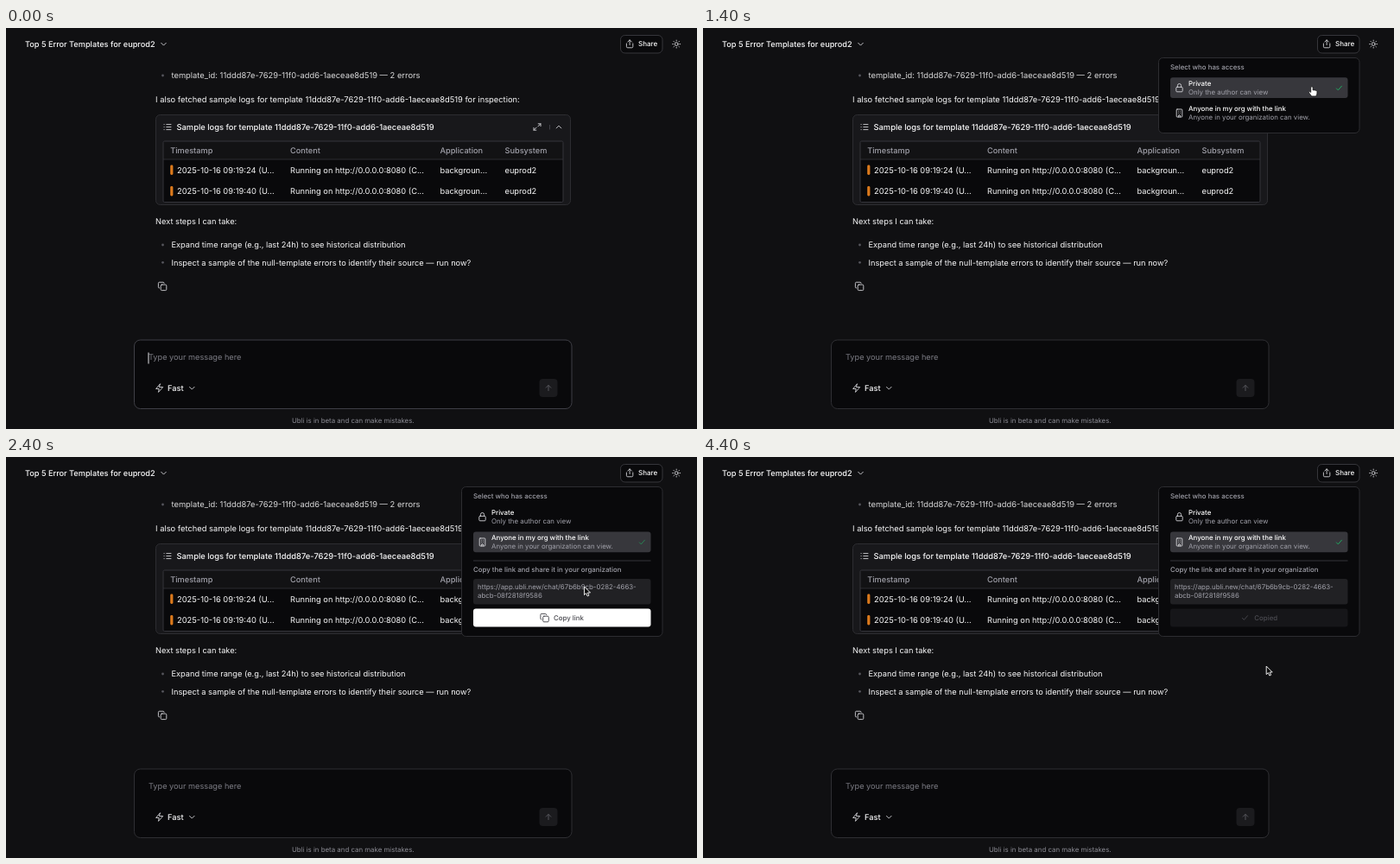
Animation of 800 by 464 pixels, one loop 4.7 s. Source, as an HTML page:

```html
<!DOCTYPE html>
<html lang="en">
<head>
<meta charset="utf-8">
<title>Share a chat</title>
<style>
  html, body { margin: 0; width: 100%; height: 100%; overflow: hidden; background: #101012; }
  svg { display: block; width: 800px; height: 464px; }
  text { font: 400 9.25px Inter, sans-serif; fill: #f8f8f9; white-space: pre; text-rendering: geometricPrecision; }
  .medium { font-weight: 500; }
  .wide { font-size: 9.35px; }
  .label { font-size: 9.2px; }
  .small { font-size: 7.87px; }
  .muted { fill: #a1a1aa; }
  .dim { fill: #7c7c84; }
  .bright { fill: #fff; }
  .icon { fill: none; stroke: #d4d4d8; stroke-width: .9; stroke-linecap: round; stroke-linejoin: round; }
  .selected { fill: #37373c; }
  .check { stroke: #1fa960; stroke-width: 1; }
</style>
</head>
<body>
<svg viewBox="0 0 800 464">
  <defs>
    <g id="copy">
      <rect x="3" y="3" width="6.6" height="6.6" rx="1.2"/>
      <path d="M1.3 6.9Q.2 6.9 .2 5.8V1.4Q.2.2 1.4.2H5.8Q6.9.2 6.9 1.3"/>
    </g>
    <path id="tick" d="M0 2.7L1.9 4.7 6 0"/>
    <path id="chevron" d="M-2.8-1.4L0 1.4 2.8-1.4"/>
  </defs>

  <!-- Header -->
  <text class="medium label" x="22" y="21.8">Top 5 Error Templates for euprod2</text>
  <use href="#chevron" class="icon" x="182.5" y="18.7"/>
  <rect id="shareButton" x="711.5" y="8.5" width="48.5" height="20.5" rx="5" stroke="#36363b"/>
  <path class="icon" d="M718.4 18V21.5Q718.4 22.8 719.7 22.8H724.5Q725.8 22.8 725.8 21.5V18M722.1 19.6V13.9M719.8 16.1L722.1 13.8 724.4 16.1"/>
  <text class="medium" x="732" y="21.4" style="font-size:8px">Share</text>
  <g class="icon" transform="translate(776.2 18.6)">
    <circle r="1.9"/>
    <path d="M0-4.5V-3.7M0 3.7V4.5M-4.5 0H-3.7M3.7 0H4.5M-3.2-3.2L-2.6-2.6M2.6 2.6L3.2 3.2M-3.2 3.2L-2.6 2.6M2.6-2.6L3.2-3.2"/>
  </g>

  <!-- Conversation -->
  <g fill="#55555c">
    <circle cx="181.5" cy="55" r="1.4"/>
    <circle cx="181.5" cy="251" r="1.4"/>
    <circle cx="181.5" cy="271.3" r="1.4"/>
  </g>
  <text class="wide" x="191.5" y="58.3" fill-opacity=".86">template_id: 11ddd87e-7629-11f0-add6-1aeceae8d519 — 2 errors</text>
  <text class="wide" x="173" y="85.6">I also fetched sample logs for template 11ddd87e-7629-11f0-add6-1aeceae8d519 for inspection:</text>

  <rect x="173.5" y="100.5" width="480" height="104" rx="5" fill="#18181b" stroke="#2d2d31"/>
  <path class="icon" d="M185.8 111.6H191M185.8 114.6H191M185.8 117.6H191M183 111.6H183.2M183 114.6H183.2M183 117.6H183.2"/>
  <text class="medium wide" x="197.5" y="117.8">Sample logs for template 11ddd87e-7629-11f0-add6-1aeceae8d519</text>
  <path class="icon" d="M616.2 110.8H619V113.6M619 110.8L615.9 113.9M613.8 118.2H611V115.4M611 118.2L614.1 115.1"/>
  <path d="M629.5 112V117.5" stroke="#3f3f46"/>
  <use href="#chevron" class="icon" transform="translate(640 114.5) scale(1 -1)"/>

  <rect x="182" y="131" width="463" height="70.5" rx="1.5" fill="#09090b"/>
  <rect x="182" y="131" width="463" height="21" fill="#121214"/>
  <path d="M182 152H645" stroke="#2d2d31"/>
  <rect x="182" y="131" width="463" height="70.5" rx="1.5" fill="none" stroke="#34343a"/>
  <text class="medium label muted" x="190.3" y="144.8">Timestamp</text>
  <text class="medium label muted" x="329" y="144.8">Content</text>
  <text class="medium label muted" x="502.5" y="144.8">Application</text>
  <text class="medium label muted" x="577.5" y="144.8">Subsystem</text>
  <g id="rows"></g>

  <text x="173" y="226.8">Next steps I can take:</text>
  <text x="191.5" y="254.3">Expand time range (e.g., last 24h) to see historical distribution</text>
  <text x="191.5" y="274.6">Inspect a sample of the null-template errors to identify their source — run now?</text>
  <use href="#copy" class="icon" x="176.2" y="294"/>

  <!-- Message box -->
  <rect id="messageBox" x="148.5" y="361" width="506.5" height="79.5" rx="7" fill="#09090b"/>
  <text class="label dim" x="165" y="384.3">Type your message here</text>
  <path id="caret" d="M165 375.5V388.5" stroke="#e4e4e7"/>
  <path class="icon" d="M178.3 412L173.6 417.5H177.2L176.5 421.4 181.7 415.5H177.7Z"/>
  <text class="medium label" x="187" y="419.8">Fast</text>
  <use href="#chevron" class="icon" x="215.3" y="416.7"/>
  <rect x="617.5" y="406" width="21" height="21" rx="4" fill="#1b1b1e"/>
  <path class="icon" d="M628 419.6V413.6M625.2 416.2L628 413.4 630.8 416.2" style="stroke:#5c5c63"/>
  <text class="small muted" x="331" y="456.8" fill-opacity=".85">Ubli is in beta and can make mistakes.</text>

  <!-- Share popup -->
  <g id="popup">
    <rect id="popupBox" x="527.5" y="34.5" width="232.5" rx="5" fill="#09090b" stroke="#2d2d31"/>
    <text class="medium small muted" x="541" y="48.2">Select who has access</text>
    <rect id="choice" class="selected" x="541" width="205.5" height="23.8" rx="3"/>
    <g class="icon">
      <rect x="547.8" y="68.4" width="7.4" height="5.4" rx="1"/>
      <path d="M549.4 68.2V66.6A2.1 2.1 0 0 1 553.6 66.6V68.2"/>
      <rect x="548.2" y="94" width="6.6" height="9" rx=".8"/>
      <path d="M550.4 96.2H550.5M552.5 96.2H552.6M550.4 98.3H550.5M552.5 98.3H552.6M550.6 103V100.8H552.4V103"/>
    </g>
    <text class="medium small bright" x="562" y="66.5">Private</text>
    <text class="small muted" x="562" y="77.1">Only the author can view</text>
    <text class="medium small bright" x="562" y="95.8">Anyone in my org with the link</text>
    <text class="small muted" x="562" y="106.2">Anyone in your organization can view.</text>
    <use id="choiceTick" href="#tick" class="icon check" x="733.4"/>
    <g id="linkPart">
      <path d="M541 120H746.5" stroke="#34343a"/>
      <text class="medium small muted" x="541" y="133.3">Copy the link and share it in your organization</text>
      <rect x="541" y="141" width="205.5" height="29.5" rx="3" fill="#212124"/>
      <text class="small muted" x="546" y="152.9">https://app.ubli.new/chat/67b6b9cb-0282-4663-</text>
      <text class="small muted" x="546" y="163.4">abcb-08f2818f9586</text>
      <rect x="541" y="175.5" width="205.5" height="21" rx="3" fill="#161619"/>
      <g id="copied">
        <use href="#tick" class="icon" x="624.5" y="183.7" style="stroke:#4b4b51"/>
        <text class="medium small" x="638.3" y="188.9" style="fill:#4b4b51">Copied</text>
      </g>
      <g id="copyButton">
        <rect id="copyFace" x="541" y="175.5" width="205.5" height="21" rx="3"/>
        <use href="#copy" class="icon" x="618.7" y="181.2" style="stroke:#3f3f46"/>
        <text class="medium small" x="634" y="188.9" style="fill:#4a4a50">Copy link</text>
      </g>
    </g>
  </g>

  <!-- Pointer -->
  <g id="pointer">
    <path id="arrow" d="M0 0V9.6L2.2 7.6 3.7 11 5.4 10.2 3.9 7H7Z" fill="#0a0a0a" stroke="#fff" stroke-width=".9" stroke-linejoin="round"/>
    <path id="hand" d="M-1.3 1a1.2 1.2 0 0 1 2.4 0V4q.9-.7 1.7.1 1-.5 1.6.3 1.3-.3 1.5 1V7.5q0 2-1.4 3.4H-.3Q-1.5 9.5-3.3 7q-.6-1 .3-1.4.8-.2 1.7.9Z" fill="#fff" stroke="#0a0a0a" stroke-width=".7"/>
    <g id="blocked" fill="none" stroke="#fff" stroke-width="1.5">
      <circle cx="6.5" cy="14" r="4.6" fill="#111113"/>
      <path d="M3.4 10.9L9.6 17.1"/>
    </g>
  </g>
</svg>
<script>
const LOOP = 4700, STEP = 100;
const byId = id => document.getElementById(id);
const show = (id, on) => byId(id).style.display = on ? '' : 'none';
const set = (id, attrs) => {
  for (const name in attrs) byId(id).setAttribute(name, attrs[name]);
};

const cell = (x, y, label, style = '') => `<text class="${style}" x="${x}" y="${y}">${label}</text>`;
byId('rows').innerHTML = ['24', '40'].map((seconds, row) => {
  const y = 167.8 + row * 24.4;
  return `<rect x="190.2" y="${y - 9.2}" width="3.2" height="11.4" rx="1.4" fill="#dc7a1c"/>` +
    cell(198, y, `2025-10-16 09:19:${seconds} (U...`, 'wide') +
    cell(329, y, 'Running on http://0.0.0.0:8080 (C...') +
    cell(502.5, y, 'backgroun...') + cell(577.5, y, 'euprod2');
}).join('');

// Pointer path: time, x, y
const path = [
  [0, 742, -14], [300, 742, -4], [500, 734, 8], [700, 728.5, 14], [1100, 728.5, 14],
  [1200, 723, 34], [1400, 705, 68], [1600, 674, 86], [1800, 659.5, 91],
  [2200, 659.5, 91], [2400, 669.5, 150], [2500, 671, 158], [2800, 668, 172],
  [3000, 664.5, 179], [3100, 664, 180.5], [3200, 663.5, 179.5], [4100, 663.5, 179.5],
  [4200, 661, 198], [4300, 655, 228], [4400, 652.2, 242], [LOOP, 652.2, 242]
];

function pointerAt(t) {
  const i = path.findIndex(key => key[0] > t);
  const [t0, x0, y0] = path[i - 1], [t1, x1, y1] = path[i];
  const k = (t - t0) / (t1 - t0);
  return [x0 + (x1 - x0) * k, y0 + (y1 - y0) * k];
}

function draw(t) {
  const focused = t < 300, open = t >= 900, shared = t >= 2100, copied = t >= 3200;

  show('caret', focused);
  set('messageBox', { stroke: focused ? '#3f3f46' : '#2f2f33' });
  show('popup', open);
  show('linkPart', shared);
  set('popupBox', { height: shared ? 173 : 87 });
  set('choice', { y: shared ? 86.4 : 57.2 });
  set('choiceTick', { y: shared ? 96.2 : 67.2, opacity: shared && t < 2600 ? .65 : 1 });
  set('copyButton', { opacity: !copied ? 1 : t < 3300 ? .4 : 0 });
  show('copied', t >= 3300);

  const [x, y] = pointerAt(t);
  const onShare = x > 711 && y >= 8 && y < 29;
  const onChoice = open && y > 57 && y < 111;
  const onCopy = shared && y >= 175 && y < 196;
  const blocked = onCopy && copied;
  const hand = !blocked && (onShare || onChoice || onCopy);
  set('shareButton', { fill: onShare ? '#27272a' : '#0a0a0c' });
  set('copyFace', { fill: onCopy ? '#e6e6e8' : '#fff' });
  set('pointer', { transform: `translate(${x} ${y})` });
  show('hand', hand);
  show('arrow', !hand);
  show('blocked', blocked);
}

function tick() {
  const t = performance.now() % LOOP;
  draw(Math.floor(t / STEP) * STEP);
  requestAnimationFrame(tick);
}
tick();
</script>
</body>
</html>
```
